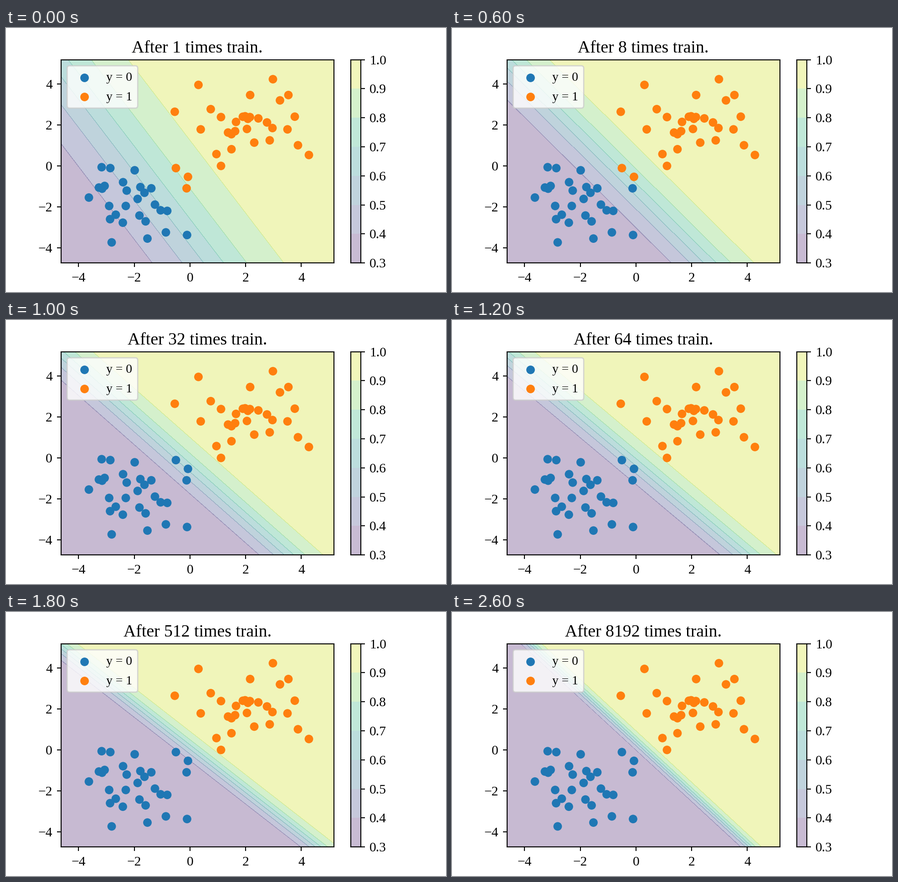
Recreate the animation shown at these times as a matplotlib script. Size 966 by 580 pixels, loop 2800 ms.

```python
import matplotlib.pyplot as plt
import numpy as np
from matplotlib.animation import FuncAnimation
from matplotlib.patches import FancyBboxPatch

W, H, DPI = 966, 580, 193.2
LEFT, RIGHT, TOP, BOTTOM = 120.75, 719.67, 69.6, 516.2
BAR_LEFT, BAR_RIGHT = 757.05, 779.4
BLUE, ORANGE = "#1f77b4", "#ff7f0e"

plt.rcParams["font.family"] = "Liberation Serif"
plt.rcParams["font.size"] = 11

# Sample positions in stage pixels
POINTS = np.array([
    (422.5, 125), (586, 112.5), (536, 147.3), (620, 147.3), (601.5, 159),
    (370.5, 184), (449.5, 178.3), (472, 195.7), (427.5, 222.7), (520, 195),
    (525, 194), (535.5, 195.7), (531, 199.5), (505, 206.3), (554, 198.6),
    (573, 207.5), (585, 219.8), (634, 194.8), (618, 222.7), (529, 221.8),
    (487.5, 229.7), (495, 233.3), (503, 226.7), (579, 246.8), (545, 251.8),
    (641, 257.6), (665, 279), (495, 266.3), (462, 277), (472, 303),
    (373, 307.8), (399.5, 327), (396.5, 352.2),
    (210, 305.8), (229, 307.8), (282.5, 312.6), (182, 372.5), (204, 350.5),
    (211, 353), (216.5, 347), (257, 338.8), (265, 357.2), (295, 349.5),
    (304, 362), (319, 352.2), (289, 375.5), (327, 388), (226.5, 391),
    (263, 391), (241, 410.2), (228.5, 420), (256.5, 427.7), (293, 412),
    (306.5, 424.8), (339.5, 400.5), (354, 401.8), (310.5, 462.6),
    (232, 471), (351, 449), (397.5, 454.8)])

# Boundary lines: step, fall per pixel, foot of the 0.5 line, spread of 0.4 to 0.9
STEPS = np.array([0, 3, 4, 6, 9, 11, 13])
FALL = np.array([1.307, 0.993, 0.935, 0.839, 0.779, 0.861, 0.925])
FOOT = np.array([387, 523, 555.5, 617, 666, 657.7, 644.5])
SPREAD = np.array([289, 182, 159, 125, 83, 60, 46])
LEVELS = [-50, -0.228, 0, 0.163, 0.315, 0.491, 0.772, 50]
SPLIT = 0.223

COLORS = plt.get_cmap("viridis")((np.arange(7) + 0.5) / 7)


def smooth(k, values):
    """Cubic Hermite curve through the values at STEPS."""
    slopes = np.gradient(values, STEPS, edge_order=2)
    i = min(np.searchsorted(STEPS, k, side="right") - 1, len(STEPS) - 2)
    h = STEPS[i + 1] - STEPS[i]
    t = (k - STEPS[i]) / h
    return ((2 * t**3 - 3 * t**2 + 1) * values[i]
            + (t**3 - 2 * t**2 + t) * h * slopes[i]
            + (3 * t**2 - 2 * t**3) * values[i + 1]
            + (t**3 - t**2) * h * slopes[i + 1])


def score(x, y, k):
    """Position across the boundary bands after 2**k rounds."""
    foot = x + (BOTTOM - y) / smooth(k, FALL)
    return (foot - smooth(k, FOOT)) / smooth(k, SPREAD)


def stage_axes(left, right):
    axes = fig.add_axes([left / W, 1 - BOTTOM / H,
                         (right - left) / W, (BOTTOM - TOP) / H])
    axes.set(xlim=(left, right), ylim=(BOTTOM, TOP))
    return axes


def signed(v):
    return str(v).replace("-", "\u2212")


fig = plt.figure(figsize=(5.00001, 3.00208), dpi=DPI, facecolor="white")
ax = stage_axes(LEFT, RIGHT)
ticks = range(-4, 5, 2)
labels = [signed(v) for v in ticks]
ax.set_xticks([403.8 + 61.15 * v for v in ticks], labels)
ax.set_yticks([303 - 45.1 * v for v in ticks], labels)
ax.tick_params(axis="x", pad=4.2)
title = ax.set_title("", fontsize=14.1)
dots = ax.scatter(*POINTS.T, s=36, zorder=2)

# Colour bar
bar = stage_axes(BAR_LEFT, BAR_RIGHT)
edges = np.linspace(BOTTOM, TOP, 8)
for low, high, color in zip(edges, edges[1:], COLORS):
    bar.axhspan(low, high, color=0.7 + 0.3 * color[:3], lw=0, antialiased=False)
bar.set_xticks([])
bar.yaxis.tick_right()
bar.set_yticks(edges, [f"{0.3 + 0.1 * i:.1f}" for i in range(8)])

# Legend
ax.add_patch(FancyBboxPatch((134.2, 83), 155, 93, fc="white", ec="0.8",
                            boxstyle="round,pad=0,rounding_size=5.4",
                            lw=1, alpha=0.8, zorder=4))
for i, color in enumerate((BLUE, ORANGE)):
    ax.scatter(172, 109.3 + 42 * i, s=36, color=color, zorder=5)
    ax.text(220, 116.3 + 42.2 * i, f"y = {i}", fontsize=10.3, zorder=5)

grid_x, grid_y = np.meshgrid([LEFT, RIGHT], [TOP, BOTTOM])
bands = []


def draw(k):
    while bands:
        bands.pop().remove()
    bands.append(ax.contourf(grid_x, grid_y, score(grid_x, grid_y, k),
                             levels=LEVELS, colors=COLORS, alpha=0.3, zorder=0))
    ax.set(xlim=(LEFT, RIGHT), ylim=(BOTTOM, TOP))
    dots.set_color([ORANGE if s > SPLIT else BLUE
                    for s in score(*POINTS.T, k)])
    title.set_text(f"After {2 ** k} times train.")
    return []


anim = FuncAnimation(fig, draw, frames=14, interval=200,
                     init_func=lambda: draw(0), repeat=True)
plt.show()
```
